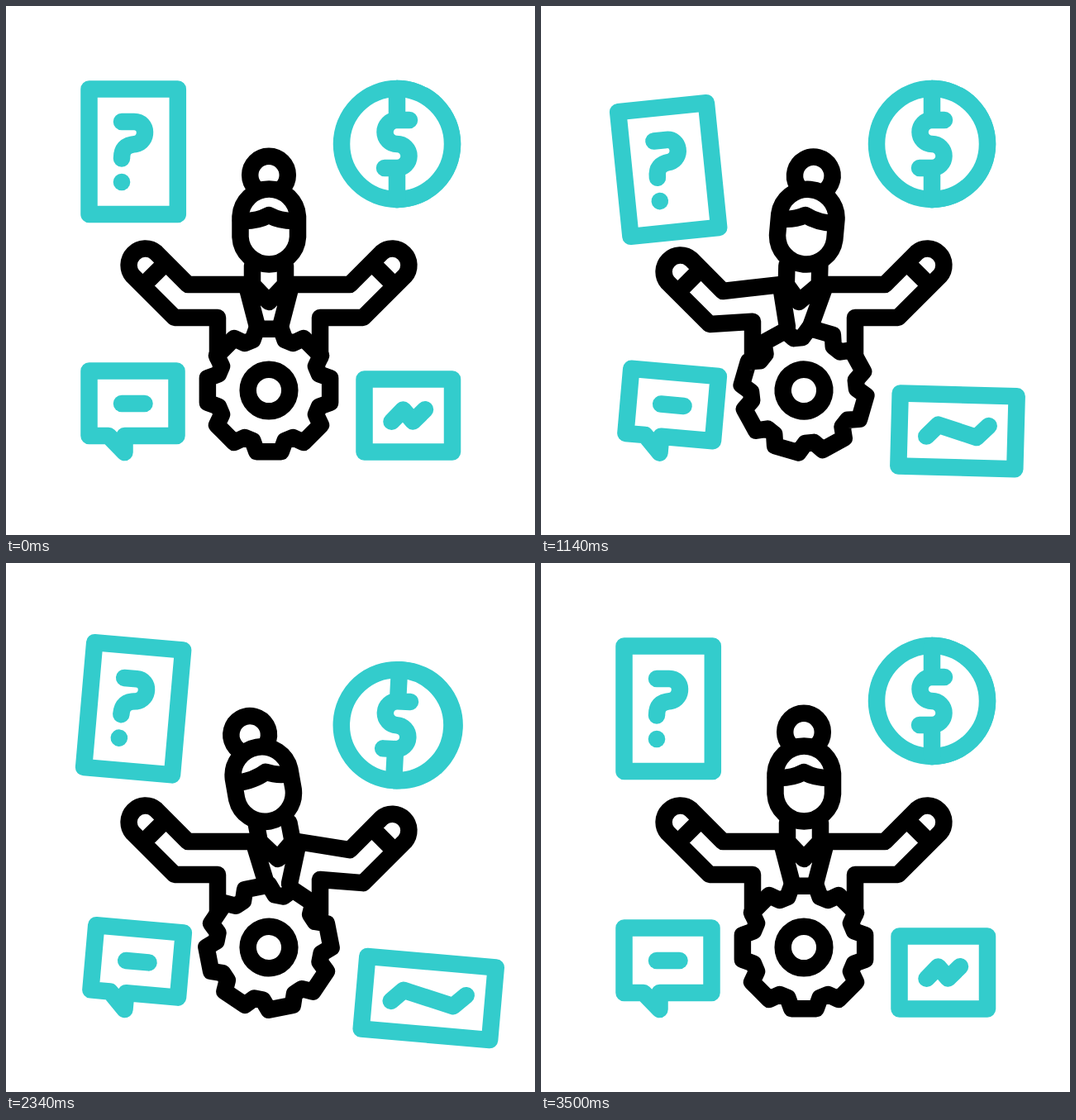
Recreate the animation shown at these times as an HTML page. Size 640 px wide and 640 px high, loop 3.6 s.

```html
<!DOCTYPE html>
<html lang="en">
<head>
<meta charset="utf-8">
<title>Juggling tasks</title>
<style>
html, body { margin: 0; width: 100%; height: 100%; overflow: hidden; background: #fff; }
svg { display: block; width: 100vw; height: 100vh; }
.line { fill: none; stroke-width: 20.5; stroke-linecap: round; stroke-linejoin: round; }
.teal { stroke: #33cccc; }
.dark { stroke: #000; }
.solid { fill: #fff; }
</style>
</head>
<body>
<svg viewBox="0 0 640 640">
  <g class="line teal">
    <g id="ask">
      <path d="M100.5 100.5H207.8V252H100.5Z"/>
      <path d="M140 140H155C172 140 172 164 157 167C145 168 140 173 140 184.5"/>
      <circle cx="140" cy="213" r="10.3" fill="#33cccc" stroke="none"/>
    </g>
    <g id="coin">
      <path id="rim"/>
      <ellipse id="face" class="solid" ry="67"/>
      <path id="dollar"/>
    </g>
    <g id="chat">
      <path d="M100.5 441.5H206.5V520H143.5V540L124 520H100.5Z"/>
      <path d="M140 481H167.5"/>
    </g>
    <g id="chart">
      <path id="frame"/>
      <path id="trend"/>
    </g>
  </g>
  <g class="line dark">
    <path id="armL"/>
    <path id="armR" transform="matrix(-1 0 0 1 636 0)"/>
    <path id="collar"/>
    <g id="head">
      <circle id="bun" class="solid" cx="318" cy="204.5" r="22.8"/>
      <path class="solid" d="M283.5 254.5a34.8 34.8 0 0 1 69.5 0V279.5a34.8 34.8 0 0 1 -69.5 0Z"/>
      <path id="fringe"/>
    </g>
    <g id="gear">
      <path id="teeth" class="solid"/>
      <circle cx="318" cy="465" r="25.3"/>
    </g>
  </g>
</svg>
<script>
const LOOP = 3600;
const $ = id => document.getElementById(id);
const set = (id, name, value) => $(id).setAttribute(name, value);
const path = (id, d) => set(id, 'd', d);
const move = (id, value) => set(id, 'transform', value);

// Smooth step from 0 to 1 between times a and b
function ease(t, a, b) {
  const p = Math.min(1, Math.max(0, (t - a) / (b - a)));
  return (1 - Math.cos(Math.PI * p)) / 2;
}

// Single swell from 0 to 1 and back between times a and b
function hop(t, a, b, power = 2) {
  return t <= a || t >= b ? 0 : Math.sin(Math.PI * (t - a) / (b - a)) ** power;
}

// Rise, fall past the rest height, recover
function toss(t, start, up, down) {
  const s = t - start;
  return -up * ease(s, 0, 580) + (up + down) * ease(s, 580, 1120) - down * ease(s, 1120, 1500);
}

// Lean to the right (1), then to the left (-1), then upright
function sway(t, turn) {
  return ease(t, 0, 560) - 2 * ease(t, turn, 1830) + ease(t, 2400, 3000);
}

function gearPath() {
  const pts = [];
  for (let i = 0; i < 8; i++) {
    for (const [deg, r] of [[-11.3, 75.6], [11.3, 75.6], [17.8, 64], [27.2, 64]]) {
      const a = (i * 45 + deg) * Math.PI / 180;
      pts.push((318 + r * Math.sin(a)).toFixed(2) + ' ' + (465 - r * Math.cos(a)).toFixed(2));
    }
  }
  return 'M' + pts.join('L') + 'Z';
}

function drawArm(id, throwY, breath, shoulder) {
  const dy = throwY + 5 * breath;
  const corner = 377 + Math.max(0, throwY) * 0.6;
  path(id, `M${shoulder} ${337 - 3 * breath}L220 ${337 + dy}L181.6 ${298.4 + dy}` +
    `A20 20 0 0 0 153.4 ${326.6 + dy}L204 ${377 + dy}L256 ${corner}V425` +
    `M193.6 ${310.4 + dy}L165.4 ${338.6 + dy}`);
}

function drawCoin(t) {
  const flip = hop(t, 1500, 2420);
  const tilt = 61 * flip * Math.PI / 180;
  const c = Math.cos(tilt), h = 21 * Math.sin(tilt), rx = 67 * c, r = 14.5 * c;
  const x = v => v * c - h;
  const rot = 40 * flip + 4 * hop(t, 2400, 3500);
  move('coin', `translate(${473 + 16.5 * flip} ${167 + toss(t, 1300, 20, 32)}) rotate(${rot})`);
  path('rim', `M${-h} -67H${h}A${rx} 67 0 0 1 ${h} 67H${-h}`);
  set('face', 'rx', rx);
  set('face', 'cx', -h);
  set('dollar', 'stroke-width', 12.5 + 8 * c);
  path('dollar', `M${x(15)} -29H${x(0)}A${r} 14.5 0 0 0 ${x(0)} 0` +
    `A${r} 14.5 0 0 1 ${x(0)} 29H${x(-15)}M${x(0)} -67V-29M${x(0)} 29V67`);
}

function drawCards(t) {
  const askRot = 10.2 * (ease(t, 0, 600) - 2 * ease(t, 600, 1380) +
    2 * ease(t, 1380, 2830) - ease(t, 3050, 3500));
  move('ask', `translate(0 ${toss(t, 0, 29, 22)}) rotate(${askRot} 154 176)`);

  const bob = 32.3 * Math.abs(Math.sin(Math.PI * 3 * Math.min(t, 3500) / 3500)) ** 1.5;
  const chatRot = -5 * ease(t, 0, 300) + 10 * ease(t, 300, 1140) - 13 * ease(t, 1140, 1780) +
    13 * ease(t, 1780, 2340) - 5 * ease(t, 3060, 3500);
  move('chat', `translate(0 ${bob}) rotate(${chatRot} 143.5 540)`);

  const swell = hop(t, 0, 1600) + hop(t, 1600, 3500);
  const grow = 56 * swell;
  const chartRot = 6.8 * swell - 6 * hop(t, 700, 2600);
  move('chart', `translate(433.5 ${495.5 + grow * 0.49}) rotate(${chartRot})`);
  path('frame', `M0 -44H${106.5 + grow}V44H0Z`);
  path('trend', `M33 7.3L47 -7L${59 + grow} 7L${73.5 + grow} -7.3`);
}

function drawFigure(t) {
  const breath = hop(t, 2750, 3500);
  const s = sway(t, 1000), lean = s * (s > 0 ? -7 : -11);
  const top = lean * (lean > 0 ? 0.8 : 0.2), y = 337 - 5.5 * breath;
  drawArm('armL', toss(t, 0, 17, 8), breath, 292 + top);
  drawArm('armR', toss(t, 1300, 23, 12), breath, 292 - top);
  path('collar', `M${298 + top / 2} 314L${298 + top} ${y}L${318 + lean} ${y + 21}` +
    `L${338 + top} ${y}L${338 + top / 2} 314` +
    `M${291.5 + top} 340L${304 + lean} 388M${344.5 + top} 340L${332 + lean} 388`);

  const nod = 10 * sway(t, 800), part = 318 - nod * 0.55;
  move('head', `rotate(${nod} 318 307)`);
  move('bun', `rotate(${nod * 2} 318 220) translate(0 ${3 * breath})`);
  path('fringe', `M284 260Q${part - 15} 261 ${part} 253Q${part + 15} 261 352.5 260`);

  const spin = 11.25 * (ease(t, 0, 560) + 2 * ease(t, 830, 1830) + ease(t, 2300, 3120));
  move('gear', `rotate(${spin} 318 465)`);
}

path('teeth', gearPath());

function render(now) {
  const t = now % LOOP;
  drawCards(t);
  drawCoin(t);
  drawFigure(t);
}

let start = null;
function tick(now) {
  if (start === null) start = now;
  render(Math.max(0, now - start));
  requestAnimationFrame(tick);
}
render(0);
requestAnimationFrame(tick);
</script>
</body>
</html>
```
